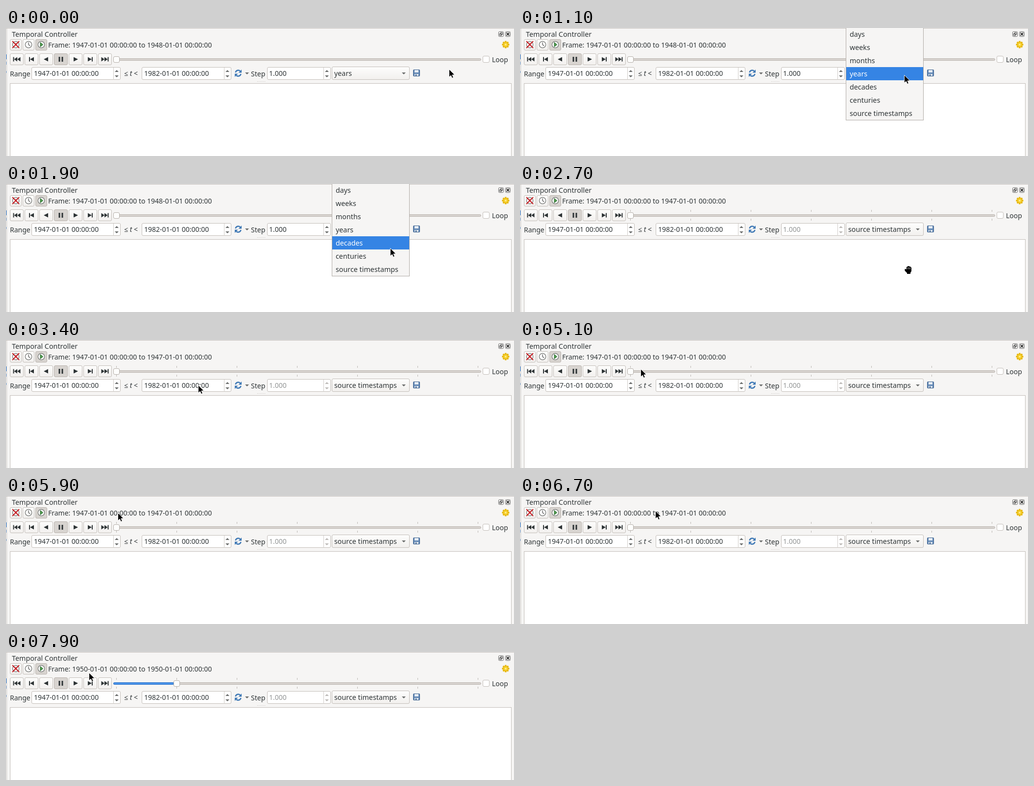
An HTML page for the animation above (8 s loop, 1037x262 px).

```html
<!DOCTYPE html>
<html lang="en">
<head>
<meta charset="utf-8">
<title>Temporal Controller</title>
<style>
  html, body { margin: 0; width: 100%; height: 100%; overflow: hidden; background: #f6f5f4; }
  svg { display: block; font: 14px "Noto Sans", "Open Sans", sans-serif; fill: #2e3436; }
  text { white-space: pre; }
  .wide { font-size: 14.3px; }
</style>
</head>
<body>
<svg id="stage" width="1037" height="262" viewBox="0 0 1037 262"></svg>
<script>
const LOOP = 8000, STEP = 100;
const BORDER = '#c3beb9', BLUE = '#3584e4', INK = '#2e3436';
const units = ['days', 'weeks', 'months', 'years', 'decades', 'centuries', 'source timestamps'];

// Pointer path: time, x, y
const path = [
  [300, 904, 84], [500, 885, 88], [800, 805, 95], [1000, 784, 96], [1400, 784, 96],
  [1900, 784, 131], [2300, 787, 168], [2800, 787, 168], [3000, 715, 140], [3300, 450, 96],
  [3500, 333, 88], [3600, 370, 88], [3800, 553, 94], [3900, 578, 98], [4000, 540, 101],
  [4200, 421, 102], [4400, 302, 94], [4500, 300, 88], [4700, 540, 97], [4800, 555, 92],
  [5100, 246, 59], [5300, 162, 40], [5400, 170, 38], [5600, 300, 40], [5700, 325, 39],
  [6000, 180, 32], [6100, 152, 31], [6200, 165, 33], [6500, 321, 35], [6700, 276, 30],
  [6900, 205, 24], [7100, 176, 38], [7300, 169, 60], [7400, 169, 62], [7600, 169, 62],
  [7900, 169, 42]
];

const rect = (x, y, w, h, fill = '#fff', stroke = BORDER, r = 2.5) =>
  `<rect x="${x + .5}" y="${y + .5}" width="${w}" height="${h}" rx="${r}" fill="${fill}" stroke="${stroke}"/>`;
const block = (x, y, w, h, fill = INK, extra = '') =>
  `<rect x="${x}" y="${y}" width="${w}" height="${h}" fill="${fill}" ${extra}/>`;
const text = (x, y, s, extra = '') => `<text x="${x}" y="${y}" ${extra}>${s}</text>`;
const line = (d, stroke, width = 1, extra = '') =>
  `<path d="${d}" fill="none" stroke="${stroke}" stroke-width="${width}" ${extra}/>`;
const shape = (d, fill = INK, extra = '') => `<path d="${d}" fill="${fill}" ${extra}/>`;
const group = (id, body, extra = '') => `<g id="${id}" ${extra}>${body}</g>`;

const button = (x, y, w, h, pressed) =>
  rect(x, y, w, h, pressed ? '#d8d4d0' : 'url(#face)', pressed ? '#b8b2ac' : BORDER);
const right = (x, w = 8) => shape(`M${x} 59.5v9l${w}-4.5z`);
const left = (x, w = 8) => shape(`M${x} 59.5v9l${-w}-4.5z`);
const down = (x, y, fill = '#6b6d6c', s = 4) => shape(`M${x - s} ${y}h${2 * s}l${-s} ${s}z`, fill);
const up = (x, y, fill = '#6b6d6c') => shape(`M${x - 4} ${y}h8l-4-4z`, fill);

const spin = (x, w, value, id, valueX = x + 5) =>
  rect(x, 80, w, 25) + block(x + w - 14, 81, 1, 25, '#d0ccc8') +
  group(id, text(valueX, 98, value) + up(x + w - 7, 90, 'currentColor') + down(x + w - 7, 97, 'currentColor'), 'color="#6b6d6c"');

function transport() {
  let out = '';
  for (let i = 0; i < 7; i++) out += button(8 + 30 * i, 52, 27, 23, i === 3);
  return out +
    block(14.5, 59.5, 2, 9) + left(23, 6.5) + left(29.5, 6.5) +
    block(47, 59.5, 2, 9) + left(57) +
    left(86, 9) +
    block(107.5, 59, 3, 10) + block(113.5, 59, 3, 10) +
    right(138, 9) +
    right(167) + block(175, 59.5, 2, 9) +
    right(194.5, 6.5) + right(201, 6.5) + block(207.5, 59.5, 2, 9);
}

function modes() {
  const clock = x => `<circle cx="${x}" cy="34" r="6.7" fill="#fafafa" stroke="#747674" stroke-width="1.2"/>`;
  return [8, 34, 60].map((x, i) => button(x, 23, 23, 22, i === 2)).join('') +
    clock(20) + line('M20 30v4l3 2', '#747674') + line('M13 27l14 14M27 27l-14 14', '#c8191f', 1.9) +
    clock(46) + line('M46 29.5v4.5l3 2.5', '#555', 1.2) +
    clock(72) + shape('M70 29.5v9l5.5-4.5z', '#4c9a4b', 'stroke="#2f6b33"');
}

function icons() {
  let teeth = '';
  for (let a = 0; a < 360; a += 45)
    teeth += block(1018.3, 26.5, 3.4, 5, '#eab90b', `transform="rotate(${a} 1020 34)"`);
  return teeth + '<circle cx="1020" cy="34" r="5.3" fill="#f6cf2b" stroke="#dca900"/>' +
    '<circle cx="1020" cy="34" r="1.7" fill="#fff0a0"/>' +
    [1005, 1019].map(x => rect(x, 7, 10, 10, '#f6f5f4', '#6b6b6b', 2)).join('') +
    line('M1009.5 9.5h4v4h-4zM1007.5 11.5h4v4h-4z', '#444') +
    line('M1021.5 9.5l6 6M1027.5 9.5l-6 6', '#333', 1.8) +
    line('M468.5 91a5.7 5.7 0 0 1 9.5-3M479.5 94a5.7 5.7 0 0 1-9.5 3', '#3e78b5', 2.5) +
    shape('M481 85v6.5h-6.5zM467 100v-6.5h6.5z', '#3e78b5') + down(492, 91, '#6b6d6c') +
    rect(831, 85, 13, 13, '#6288b5', '#3f638f', 1) + block(834, 86, 8, 5, '#e9eff5') +
    block(834, 94, 8, 4, '#d6dfe9') + block(836, 95, 2, 3, '#3f638f');
}

function slider() {
  let ticks = '';
  for (let x = 225; x < 970; x += 123) ticks += `M${x + .5} 53v4M${x + .5} 71v4`;
  return group('ticks', line(ticks, '#b9b5b1')) +
    rect(219, 62, 750, 4, '#d8d4d0', '#bbb5af', 2) +
    group('filled', rect(219, 62, 123, 4, '#4a93e8', '#2a70c8', 2)) +
    group('handle', rect(219, 58, 12, 12, '#fdfdfc', '#b5afa9'));
}

const popup = block(665, 0, 159, 189, '#b0aba6') + block(666, 0, 157, 188, '#f6f5f4') +
  block(666, 0, 157, 27, BLUE, 'id="hover"') +
  units.map((u, i) => text(673, 18 + 27 * i, u, 'class="wide unit"')).join('');

const arrow = shape('M.5 .5v16l3.7-3.4 2.5 5.4 2.6-1.2-2.4-5.2 5-.3z', '#000', 'stroke="#fff" stroke-width=".9"');
const hand = shape('M786 175v3l4 4v2.500h7v-2.500l2-3v-8l-2-1-2-1.500-2 0-2 0-2 1v5z', '#000', 'stroke="#fff" stroke-width="2" stroke-linejoin="round"') +
  shape('M785.500 174l2 0 1.500 1v-5l2-1 1-1h2l1.500 1 2 .5 1.500 2v7l-2 3v2.500h-7v-2l-4.500-4.500z', '#000') +
  line('M791.500 170.500v4M794 170.500v4M796.500 171v3.500', '#fff', .7);

const stage = document.getElementById('stage');
stage.innerHTML =
  '<defs><linearGradient id="face" x2="0" y2="1"><stop stop-color="#fdfdfc"/><stop offset="1" stop-color="#f2f0ee"/></linearGradient></defs>' +
  block(0, 0, 1037, 262, '#f6f5f4') + block(0, 0, 1037, 1, '#c5c1bd') +
  block(0, 1, 1, 261, '#fff') + block(1, 1, 1, 261, '#c5c1bd') +
  block(0, 54, 1, 10, BLUE) + block(0, 69, 1, 6, '#8bb8ee') + block(0, 88, 1, 4, '#8bb8ee') +
  text(12, 18, 'Temporal Controller', 'class="wide"') +
  modes() + text(86, 40, '', 'id="frame"') + transport() + slider() +
  rect(973, 57, 13, 13) + text(992, 70, 'Loop') +
  text(8, 99, 'Range') + spin(52, 181, '1947-01-01 00:00:00', 'from') +
  text(241, 98, '≤ <tspan font-style="italic">t</tspan> &lt;') +
  spin(277, 182, '1982-01-01 00:00:00', 'until') +
  text(500, 99, 'Step') + spin(533, 129, '1.000', 'amount', 537) +
  rect(665, 79, 158, 26, 'url(#face)') + text(670, 98, '', 'id="unit" class="wide"') + down(812, 91) +
  icons() + line('M513 109.500h16', '#bdb9b5', 1, 'stroke-dasharray="1 2"') +
  rect(8, 113, 1023, 160, '#fff', '#c3beb9', 0) +
  group('popup', popup) + group('hand', hand) + group('arrow', arrow);

const el = id => document.getElementById(id);
const show = (id, on) => el(id).setAttribute('display', on ? 'inline' : 'none');
const unitLabels = document.querySelectorAll('.unit');

function pointer(t) {
  const i = path.findIndex(p => p[0] > t);
  if (i === 0) return path[0].slice(1);
  if (i < 0) return path[path.length - 1].slice(1);
  const [t0, x0, y0] = path[i - 1], [t1, x1, y1] = path[i];
  const k = (t - t0) / (t1 - t0);
  return [Math.round(x0 + (x1 - x0) * k), Math.round(y0 + (y1 - y0) * k)];
}

function render(now) {
  const t = Math.floor(now % LOOP / STEP) * STEP;
  const stamps = t >= 2700, advanced = t >= 7600, grabbing = stamps && t < 2900;
  const [x, y] = pointer(t);
  const start = advanced ? 1950 : 1947, end = stamps ? start : 1948;
  el('frame').textContent = `Frame: ${start}-01-01 00:00:00 to ${end}-01-01 00:00:00`;
  el('unit').textContent = stamps ? 'source timestamps' : 'years';
  el('amount').setAttribute('color', stamps ? '#bdbab7' : '#6b6d6c');
  el('amount').setAttribute('fill', stamps ? '#929595' : INK);
  show('ticks', stamps);
  show('filled', advanced);
  el('handle').setAttribute('transform', `translate(${advanced ? 123 : 0} 0)`);

  const row = Math.min(6, Math.floor((y + 1) / 27));
  show('popup', t >= 1100 && !stamps);
  el('hover').setAttribute('y', row * 27 - 1);
  unitLabels.forEach((label, i) => label.setAttribute('fill', i === row ? '#fff' : INK));

  show('hand', grabbing);
  show('arrow', !grabbing);
  el('arrow').setAttribute('transform', `translate(${x} ${y})`);
}

function tick() {
  render(performance.now());
  requestAnimationFrame(tick);
}
tick();
</script>
</body>
</html>
```
